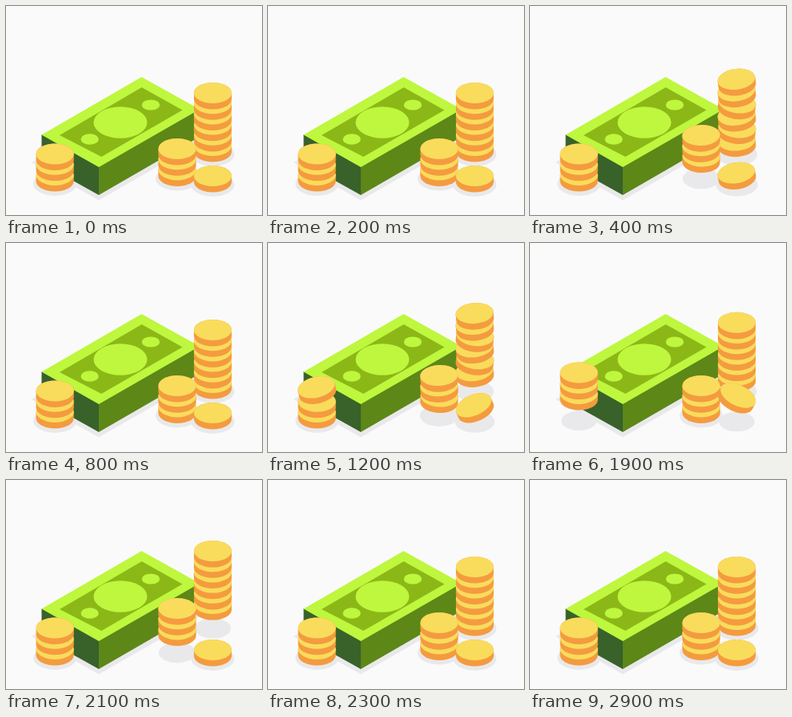
An HTML page with a canvas for the animation above (3000 ms loop, 320 by 262 pixels).

```html
<!DOCTYPE html>
<html lang="en">
<head>
<meta charset="utf-8">
<title>Hopping coins</title>
<style>
html, body { margin: 0; width: 100%; height: 100%; overflow: hidden; background: #fafafb; }
canvas { display: block; width: 320px; height: 262px; }
</style>
</head>
<body>
<canvas id="stage"></canvas>
<script>
const LOOP = 3000, STEP = 100, HOP = 400;
const RX = 23.6, RY = 13, THICK = 7.6, PITCH = 13.2;
const color = {
  back: '#fafafb', shadow: '#e9e9eb', gold: '#f9dc5c', rim: '#f49b3f',
  lime: '#bef73d', olive: '#8bb817', left: '#38622a', right: '#5d8717'
};

// x, y: centre of the top face; hops: start times; lag: delay per coin, top first
const stacks = [
  { x: 258.5, y: 109, count: 6, height: 22, sway: 8, lag: 17, hops: [285, 1040, 1845] },
  { x: 61.2, y: 185.5, count: 3, height: 23, sway: 34, lag: 30, hops: [400, 1173, 1700] },
  { x: 214, y: 179, count: 3, height: 18, sway: 3, lag: 0, hops: [244, 1098, 1900] },
  { x: 258.5, y: 213, count: 1, height: 25, sway: 32, lag: 0, hops: [380, 1148, 1640] }
];

const canvas = document.getElementById('stage');
const ctx = canvas.getContext('2d');
const ratio = window.devicePixelRatio || 1;
canvas.width = 320 * ratio;
canvas.height = 262 * ratio;

function poly(fill, ...points) {
  ctx.fillStyle = fill;
  ctx.beginPath();
  points.forEach(([x, y]) => ctx.lineTo(x, y));
  ctx.fill();
}

function oval(fill, x, y, rx, ry) {
  ctx.fillStyle = fill;
  ctx.beginPath();
  ctx.ellipse(x, y, rx, ry, 0, 0, Math.PI * 2);
  ctx.fill();
}

function coin(x, y, tilt) {
  ctx.save();
  ctx.translate(x, y + THICK / 2);
  ctx.rotate(tilt * Math.PI / 180);
  ctx.fillStyle = color.rim;
  ctx.beginPath();
  ctx.ellipse(0, THICK / 2, RX, RY, 0, 0, Math.PI);
  ctx.ellipse(0, -THICK / 2, RX, RY, 0, Math.PI, Math.PI * 2);
  ctx.fill();
  oval(color.gold, 0, -THICK / 2, RX, RY);
  ctx.restore();
}

// Coins leave one after another and land together; the last hop keeps a stack stiff
function pose({ count, height, sway, lag, hops }, i, time) {
  const k = hops.findIndex(start => time > start && time < start + HOP);
  if (k < 0) return { lift: 0, tilt: 0 };
  const loose = count === 1 || k < hops.length - 1;
  const wait = loose ? lag * i : 0;
  const u = Math.max(0, (time - hops[k] - wait) / (HOP - wait));
  const side = i === 0 || i % 2 ? -1 : 1;
  return {
    lift: height * Math.sin(Math.PI * u),
    tilt: loose ? side * sway * Math.sin(2 * Math.PI * u) : 0
  };
}

function drawShadow(stack, time) {
  const last = stack.count - 1;
  const size = 1 - pose(stack, last, time).lift * 0.008;
  oval(color.shadow, stack.x, stack.y + last * PITCH + 11, 27 * size, 15 * size);
}

function drawStack(stack, time) {
  for (let i = stack.count - 1; i >= 0; i--) {
    const { lift, tilt } = pose(stack, i, time);
    coin(stack.x, stack.y + i * PITCH - lift, tilt);
  }
}

function drawNotes() {
  poly(color.left, [44.5, 161], [116, 201], [116, 237], [44.5, 197]);
  poly(color.right, [116, 201], [242, 129], [242, 164], [116, 237]);
  poly(color.lime, [169.5, 89], [242, 129.5], [116, 202], [44.5, 161.5]);
  poly(color.olive, [169.7, 102], [220.5, 130.5], [119.3, 189], [67, 162]);
  oval(color.lime, 143, 146, 33.5, 19.7);
  oval(color.lime, 181, 124, 11.2, 6.6);
  oval(color.lime, 104.7, 167, 11.2, 6.7);
}

function draw(time) {
  ctx.setTransform(ratio, 0, 0, ratio, 0, 0);
  ctx.fillStyle = color.back;
  ctx.fillRect(0, 0, 320, 262);
  poly(color.shadow, [32, 196], [116, 243.5], [242, 171], [242, 150], [116, 200], [46, 188]);
  stacks.forEach(stack => drawShadow(stack, time));
  drawNotes();
  stacks.forEach(stack => drawStack(stack, time));
}

const start = performance.now();
function tick() {
  const time = (performance.now() - start) % LOOP;
  draw(Math.floor(time / STEP) * STEP);
  requestAnimationFrame(tick);
}
tick();
</script>
</body>
</html>
```
